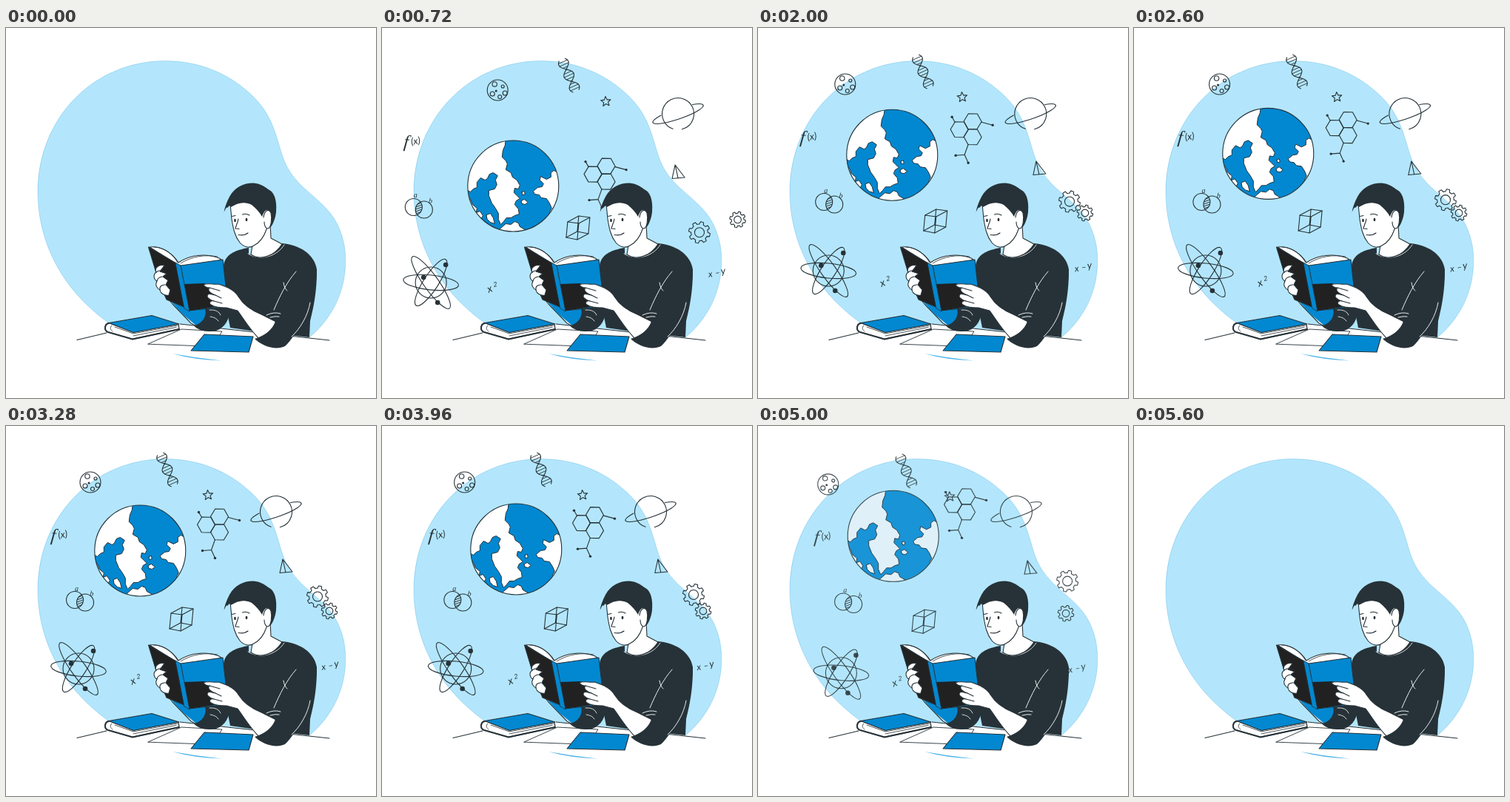
Write an HTML page with a canvas that moves like this. It is 500 px wide and 500 px high and loops after 6 s.

```html
<!DOCTYPE html>
<html lang="en">
<head>
<meta charset="utf-8">
<title>Reading and learning</title>
<style>
html, body { margin: 0; width: 100%; height: 100%; overflow: hidden; background: #fff; }
canvas { display: block; width: 100vmin; height: 100vmin; }
</style>
</head>
<body>
<canvas id="stage" width="500" height="500"></canvas>
<script>
const canvas = document.getElementById('stage');
const ratio = window.devicePixelRatio || 1;
canvas.width = canvas.height = 500 * ratio;
const c = canvas.getContext('2d');

const LOOP = 6000;
const INK = '#263238', BLACK = '#212121', BLUE = '#0288d1', SKY = '#b3e6fc', WHITE = '#fff';
const SERIF = '"Liberation Serif", serif';
const clamp = (v, a = 0, b = 1) => Math.min(b, Math.max(a, v));

function shape(d, fill, stroke, width = 1.1) {
  const p = new Path2D(d);
  if (fill) { c.fillStyle = fill; c.fill(p); }
  if (stroke) { c.strokeStyle = stroke; c.lineWidth = width; c.stroke(p); }
}
const line = (d, color = INK, width = 1.1) => shape(d, null, color, width);

function ellipse(x, y, rx, ry = rx, turn = 0, from = 0, to = Math.PI * 2) {
  c.beginPath();
  c.ellipse(x, y, rx, ry, turn, from, to);
  c.strokeStyle = INK;
  c.lineWidth = 1.1;
  c.stroke();
}
function dot(x, y, r, ry = r) {
  c.beginPath();
  c.ellipse(x, y, r, ry, 0, 0, Math.PI * 2);
  c.fillStyle = INK;
  c.fill();
}
function label(text, x, y, size, turn = 0, family = 'Lato, sans-serif') {
  c.save();
  c.translate(x, y);
  c.rotate(turn);
  c.font = `italic ${size}px ${family}`;
  c.fillStyle = INK;
  c.fillText(text, 0, 0);
  c.restore();
}

function polar(count, radius, turn = 0) {
  let d = '';
  for (let i = 0; i < count; i++) {
    const a = turn + i * Math.PI * 2 / count, r = radius(i);
    d += `${i ? 'L' : 'M'}${r * Math.cos(a)} ${r * Math.sin(a)}`;
  }
  return d + 'Z';
}

function moon() {
  ellipse(0, 0, 14);
  ellipse(-4, -8, 3.2);
  ellipse(7, -5, 2);
  ellipse(10, 4, 3);
  ellipse(-7, 5, 3);
  ellipse(3, 9, 2.5);
  dot(-2, 1, 1.5);
}

function dna() {
  c.save();
  c.rotate(-0.42);
  const wave = y => 7 * Math.cos(y * Math.PI / 18);
  let left = '', right = '';
  for (let y = -23; y <= 23; y++) {
    left += `${left ? 'L' : 'M'}${wave(y)} ${y}`;
    right += `${right ? 'L' : 'M'}${-wave(y)} ${y}`;
  }
  line(left);
  line(right);
  for (let y = -20; y <= 20; y += 4) line(`M${wave(y)} ${y}H${-wave(y)}`, INK, 0.8);
  c.restore();
}

const star = () => line(polar(10, i => i % 2 ? 3.1 : 7, -Math.PI / 2 - 0.08));

function saturn() {
  ellipse(0, 0, 21.5, 21.5, 0, 1.9, 7.6);
  ellipse(0, 0, 36, 7, -0.33, -0.9, Math.PI + 0.9);
}

const pyramid = () => line('M-4 -10L-8 8.5L9 7ZM-4 -10L0 8');

function gear(r, teeth) {
  line(polar(teeth * 8, i => i % 8 < 4 ? r : r * 0.78, 0.1));
  ellipse(0, 0, r * 0.45);
}

function difference() {
  label('x', -12, 6, 12, -0.15);
  label('–', -3, 4, 12, -0.15);
  label('y', 5, 2, 13, -0.15);
}

function cube() {
  line('M-14 -8L1 -6L-1 16L-16 13ZM1 -16L16 -14L14 8L-1 5Z');
  line('M-14 -8L1 -16M1 -6L16 -14M-1 16L14 8M-16 13L-1 5');
}

function molecule() {
  for (const [x, y] of [[1, -11], [-17, 0], [1, 10]]) {
    c.save();
    c.translate(x, y);
    line(polar(6, () => 12, 0.02));
    c.restore();
  }
  line('M-23 -10L-27 -17M13 -10L28 -6M-5 20L-10 34L-22 35M-10 34L-5 45');
  for (const [x, y] of [[-27, -17], [28, -6], [-22, 35], [-5, 45]]) dot(x, y, 1.7);
}

function globe() {
  c.save();
  c.beginPath();
  c.arc(0, 0, 61.5, 0, Math.PI * 2);
  c.fillStyle = BLUE;
  c.fill();
  c.clip();
  shape('M-10 -64L-11 -55L-14 -48L-15 -39L-10 -34L-8 -30L-10 -22L-3 -18L-1 -12L5 -8L9 -1L7 4L2 3L1 9L5 13L9 17L4 20L2 25L7 31L8 38L2 40L-3 43L-9 43L-13 48L-17 52L-20 45L-20 37L-24 30L-29 23L-33 13L-33 6L-25 4L-22 -2L-24 -8L-21 -14L-27 -18L-32 -16L-35 -10L-38 -8L-44 -11L-49 -5L-49 2L-54 4L-58 8L-66 3V-64Z', WHITE, INK, 1);
  shape('M64 -16L55 -21L51 -18L51 -12L45 -9L37 -13L36 -8L41 -3L39 1L33 2L27 7L29 11L35 12L38 16L45 17L49 23L52 30L49 35L53 38L66 25Z', WHITE, INK, 1);
  shape('M-65 15L-58 17L-55 25L-49 30L-50 36L-45 34L-41 40L-44 46L-40 53L-60 48Z', WHITE, INK, 1);
  shape('M-36 39L-31 37L-27 43L-25 51L-31 49L-35 45Z', WHITE, INK, 1);
  shape('M-18 58L-10 51L-3 52L2 48L7 50L9 55L16 59L5 66L-16 64Z', WHITE, INK, 1);
  shape('M12 8L15 7L16 11L13 12ZM11 20L15 18L20 22L16 25L12 24Z', WHITE, INK, 1);
  c.restore();
  ellipse(0, 0, 61.5);
}

function functionSign() {
  label('f', -13, 6, 24, 0.1, SERIF);
  label('(x)', -2, 3, 13, -0.15);
}

function venn() {
  ellipse(-7, -1.5, 11.5);
  ellipse(7, 2, 11.5);
  c.save();
  c.beginPath();
  c.arc(-7, -1.5, 11.5, 0, 7);
  c.clip();
  c.beginPath();
  c.arc(7, 2, 11.5, 0, 7);
  c.clip();
  for (let y = -12; y < 16; y += 3) line(`M-8 ${y + 3}L8 ${y - 3}`, INK, 1);
  c.restore();
  label('a', -7, -14, 10, 0, SERIF);
  label('b', 13, -7, 10, 0.1, SERIF);
}

function atom() {
  ellipse(0, 0, 21);
  ellipse(0, 0, 37.5, 10, 0.1);
  ellipse(0, 0, 43, 10, 0.95);
  ellipse(0, 0, 37, 10, -1);
  dot(20, -24, 3.3);
  dot(-10, -7, 3.3);
  dot(9, 27, 3.3);
}

function square() {
  label('x', -4, 7, 14, -0.35);
  label('2', 3, -1, 9, -0.2);
}

// Each icon: drawing, resting place, arrival offset, slow drift.
const icons = [
  [globe, 181.3, 168.5, -4, 38, 0, -6],
  [moon, 114, 76, 34, 8, -7, 0],
  [dna, 218, 59, 24, 5, -9, 0],
  [star, 273, 93.5, 23, 6, -5.5, 0],
  [saturn, 365, 116, 28, 0, -6, 0],
  [pyramid, 378, 190, 18, 5, -3.5, 0],
  [() => gear(14.5, 8), 421, 230.5, 8, 37, 0, -7.5],
  [() => gear(10.8, 8), 437, 250, 33, 9, -9, 0],
  [difference, 439, 324, 11, 8, -3, 0.8],
  [cube, 237, 261, 22, 9, -5, 0],
  [molecule, 287.5, 133.5, 11, 56, -3, -7],
  [functionSign, 73, 149, -23, 6, 7, 0],
  [venn, 100, 236.5, -42, 7, 7, 0],
  [atom, 98, 328, -26, 16, 5, 0],
  [square, 174, 343, -19, 8, 6, 0]
];

function drawIcons(t) {
  const alpha = Math.min(clamp((t - 60) / 300), clamp((5260 - t) / 300));
  if (!alpha) return;
  const arrive = Math.max(0, (1330 - t) / 610) ** 2.6;
  const leave = Math.max(0, (t - 4590) / 610) ** 2.6;
  const v = clamp((t - 3000) / 1560, -1.05, 1.05);
  const drift = 0.5 * v + 0.5 * v ** 3 - 0.09;
  for (const [draw, x, y, ax, ay, dx, dy] of icons) {
    const sink = ay > 30 ? -1 : 1;
    c.save();
    c.globalAlpha = alpha;
    c.translate(x + ax * (arrive - leave) + dx * drift,
                y + ay * (arrive + sink * leave) + dy * drift);
    draw();
    c.restore();
  }
}

function drawBlob() {
  const edge = 'M138 398C102 372 77 341 62 308C49 280 43 250 43 222C43 120 120 44.5 215 44.5C262 44.5 300 62 328 87C362 117 364 146 375 177C388 212 418 225 438 250C466 285 464 340 443 378C433 396 422 408 410 418';
  shape(edge + 'L235 400L150 407Z', SKY);
  line(edge, 'rgba(2,136,209,.45)', 0.5);
  shape('M225 440Q257 446 291 449.5Q254 448.5 225 440Z', '#4db5ea');
}

function drawDesk() {
  shape('M96 421L134 412L235 400L437 422L400 438H100Z', WHITE);
  line('M96 421.5L136 412M235 400L437 422');
  shape('M192 427L237 407L292 410L279 430Z', WHITE, INK, 0.9);
  shape('M268 414L334 417L328 438L250 436Z', BLUE, INK);
  shape('M139 398.5C133 400 132 409 138 411L171 420.5L234 407L233 400L172 411Z', WHITE, INK, 1.3);
  line('M139 399C133 400 132 409 138 411L171 420.5L234 407', INK, 2);
  line('M143 402C140 405 141 408 144 410M147 404L172 413L232 402M172 416L230 404.5', INK, 0.8);
  shape('M139 398.5L197 388.5L233.5 400L172 411.5Z', BLUE, INK, 1.2);
}

function drawHead(t) {
  shape('M334 288L331 306C344 315 363 308 373 292L358 284L357 264Z', WHITE, INK);
  shape('M303 238L305 258C307 271 309 281 316 290C321 296 329 298 335 294C343 290 348 284 352 272L358 250L342 230Z', WHITE, INK);
  shape('M294.5 249C296 240 300 232 302 228C309 215 321 209.5 334 209.5C345 210 351 216 356 219C365 224 366 239 365 249C364 258 360 267 357 270C359 260 359 252 355 246C350 245 348 250 346 255C343 249 338 244 332 239C323 234 313 236 304 242L302 240L299 243C298 242 298 242 294.5 249Z', INK);
  shape('M348 256C349 247 355 243 358 250C360 258 358 270 354 271C350 271 349 265 349 262', WHITE, INK);
  line('M314 258C313 264 310 269 310 271L315 271.5M314 279.5Q322 281 327 277', INK, 1.2);
  line('M305.5 254.5L310 253.5M319.5 252Q324 250 329 253', INK, 1.1);
  if (t >= 4440 && t < 4680) {
    line('M307 261Q310 262 313 260M321 260Q325 261 329 259');
  } else {
    dot(309.5, 260, 1.4, 2.3);
    dot(325, 259, 1.4, 2.3);
  }
}

function drawBody() {
  shape('M328 297C309 300 295 307 294 322L297 375L303 405L337 410L410 418L411 396C419 365 420 345 420 326C417 306 397 293 373 291C366 306 346 314 328 305Z', INK);
  line('M327 305C344 316 367 308 376 293', WHITE, 0.8);
}

function drawFarArm() {
  shape('M213 358L225 373L250 399L259 404L272 384L240 363Z', WHITE, INK);
  shape('M217 363L245 380L281 373L272 391L258 403L239 387Z', BLUE);
  shape('M269 379C283 374 296 375 302 379C303 393 296 405 284 409C271 412 258 408 254 402C264 400 272 391 269 379Z', INK);
  line('M275 381Q287 380 290 388M276 390Q284 391 287 396', WHITE, 0.8);
}

function drawOpenBook() {
  shape('M194 296C209 294 224 303 233 317C251 305 272 305 288 311L292 314L237 322L229 318Z', WHITE, INK);
  line('M200 296C215 296 226 307 232 317M236 318C252 308 270 306 286 309', INK, 0.8);
  shape('M192.5 296L230 318L243 378L217 367L207 344Z', BLACK, INK);
  shape('M236 321L293 313L297 348L284 378L247 382Z', BLUE, INK);
  shape('M241 346L268 345L289 371L283 377L247 382Z', BLACK);
  shape('M229 317L236 321L248 383L241 379Z', BLUE, INK, 0.8);
}

function drawHands() {
  shape('M214 321C207 319 200 324 203 330C198 334 200 340 204 342C201 347 204 352 208 354C209 359 214 362 220 361L222 354L216 347L219 341L212 336L217 332L208 329Z', WHITE, INK);
  line('M203 330Q208 326 214 329M204 342Q205 337 211 336M208 354Q207 347 215 347');

  shape('M309 371L343 419L350 419L325 383Z', BLUE);
  shape('M267 347C272 344 281 347 287 346C297 349 309 354 314 363C322 376 335 383 345 387L365 397L362 405L343 421C329 407 322 394 313 382L298 378C289 378 281 377 277 374C273 371 277 368 281 369C274 367 270 363 273 360C275 358 279 361 283 361C275 358 272 354 275 351C271 351 268 349 267 347Z', WHITE, INK);
  line('M275 351L289 355M283 361L291 365M281 369L292 372');
}

function drawNearSleeve() {
  shape('M420 326C420 352 412 372 403 390C395 407 386 422 377 430C365 436 346 430 336 420C350 416 361 407 364 396C361 390 355 389 350 388C358 384 363 386 367 387L388 340Z', INK);
  line('M392 329C379 344 370 362 362 381M375 344Q376 352 380 355M352 388Q362 383 371 386M357 391Q365 389 369 390', WHITE, 0.9);
  line('M411 371C408 389 397 407 386 417', WHITE, 0.9);
}

function render(t) {
  c.setTransform(ratio, 0, 0, ratio, 0, 0);
  c.lineJoin = c.lineCap = 'round';
  c.fillStyle = WHITE;
  c.fillRect(0, 0, 500, 500);
  drawBlob();
  drawIcons(t);
  drawDesk();
  drawBody();
  drawHead(t);
  drawFarArm();
  drawOpenBook();
  drawHands();
  drawNearSleeve();
}

const start = performance.now();
function tick() {
  render((performance.now() - start) % LOOP);
  requestAnimationFrame(tick);
}
tick();
</script>
</body>
</html>
```
